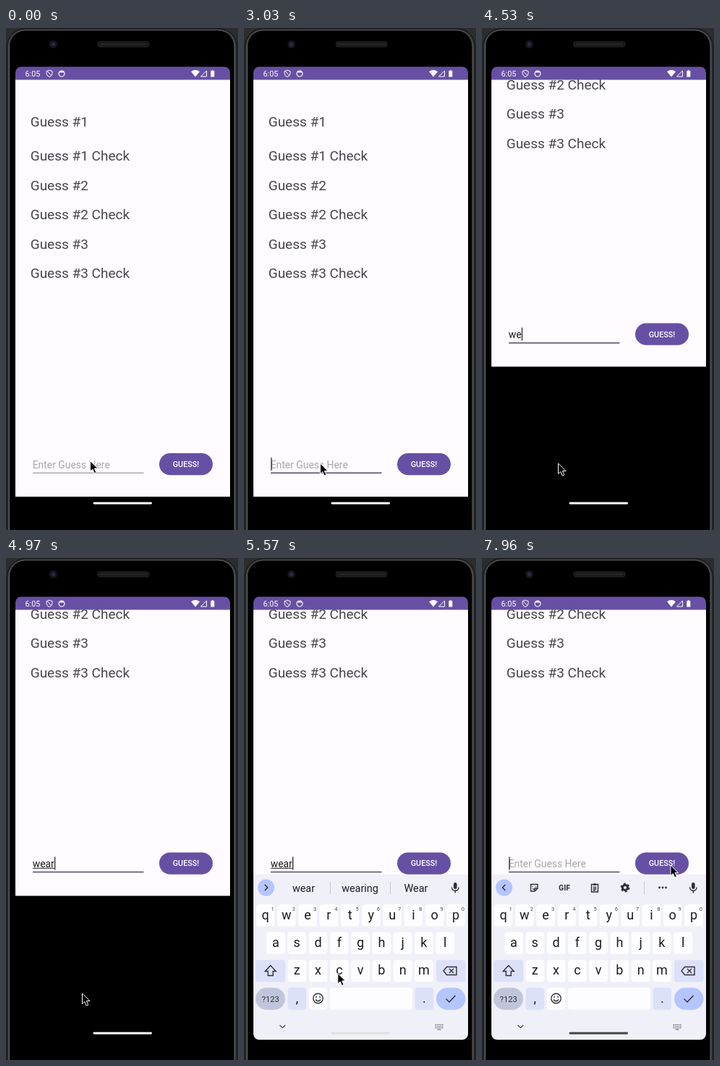
These frames come from a looping animation (321 by 693 pixels, 8 s). An HTML page:

```html
<!DOCTYPE html>
<html lang="en">
<head>
<meta charset="utf-8">
<title>Word guessing app</title>
<style>
  html, body { margin: 0; width: 100%; height: 100%; overflow: hidden; background: #000; }
  svg { display: block; width: 321px; height: 693px; font-family: Roboto, sans-serif; }
  .list { font-size: 19px; fill: #49454f; }
  .field { font-size: 13.9px; fill: #1c1b1f; }
  .key { font-size: 18px; text-anchor: middle; fill: #1b1b21; }
  .digit { font-size: 7.5px; text-anchor: middle; fill: #45464f; }
  .word { font-size: 14.4px; text-anchor: middle; fill: #1b1b21; }
  .line { fill: none; stroke: #303038; stroke-width: 1.4; }
</style>
</head>
<body>
<svg viewBox="0 0 321 693">
  <defs>
    <clipPath id="page"><rect x="13" y="71" width="297" height="594"/></clipPath>
    <clipPath id="screen"><path d="M13 71H310V657a8 8 0 0 1-8 8H21a8 8 0 0 1-8-8Z"/></clipPath>
  </defs>

  <!-- phone body -->
  <rect width="321" height="693" fill="#2c2c2f"/>
  <rect x="1.500" y="1" width="318" height="720" rx="25" fill="#38393c" stroke="#0e0e10"/>
  <rect x="4.500" y="3" width="311.500" height="720" rx="22" fill="#000" stroke="#606165"/>
  <circle cx="65.500" cy="22.500" r="5.500" fill="#15161d"/>
  <circle cx="65.500" cy="22.500" r="2.500" fill="#262c4c"/>
  <rect x="127" y="19" width="71" height="7" rx="3" fill="#161516" stroke="#2a2829"/>
  <path d="M130 22.500H196" stroke="#333031" stroke-width="3" stroke-dasharray="1 1"/>

  <!-- app page -->
  <g clip-path="url(#page)">
    <g id="app">
      <rect x="13" y="71" width="297" height="576" fill="#fffbfe"/>
      <g id="list" class="list"></g>
      <path id="rule" d="M37 614.200H190.500"/>
      <text id="input" class="field" x="36.700" y="607.500"></text>
      <path id="composing" stroke="#1c1b1f"/>
      <path id="caret" stroke="#1c1b1f" stroke-width="1.200"/>
      <rect x="212" y="587" width="74" height="30.300" rx="15.150" fill="#6750a4"/>
      <text x="249" y="606" fill="#fff" font-size="10.800" font-weight="500" text-anchor="middle">GUESS!</text>
    </g>
  </g>

  <!-- status bar -->
  <path d="M13 71.500V61.500a8 8 0 0 1 8-8H302a8 8 0 0 1 8 8V71.500Z" fill="#6750a4"/>
  <g fill="#fff">
    <text x="26.500" y="66.800" font-size="10.800">6:05</text>
    <path d="M60 58.200L64 59.700V62.500Q64 66 60 67.600Q56 66 56 62.500V59.700ZM57.500 60L62.500 65.500" fill="none" stroke="#fff"/>
    <circle cx="77" cy="63" r="4" fill="none" stroke="#fff" stroke-width="1.200"/>
    <path d="M73.500 61.500A3.800 3.800 0 0 1 80.500 61.500Z"/>
    <path d="M256 60.300Q262 55.700 268 60.300L262 67.500Z"/>
    <path d="M269.500 67L277.500 59V67Z" fill="none" stroke="#fff"/>
    <path d="M284.700 58.300h2v1h1.600v8.200h-5v-8.200h1.400Z"/>
  </g>

  <!-- keyboard -->
  <g clip-path="url(#screen)">
    <g id="keyboard">
      <rect x="13" y="437" width="297" height="230" fill="#f0f0f9"/>
      <g id="keys"></g>
      <circle cx="30.500" cy="455" r="11.500" fill="#b4c5ff"/>
      <path id="chevron" class="line" stroke-width="1.600"/>
      <g id="tools">
        <path class="line" d="M67.500 450.500h9.500v5.500l-4 4h-5.500ZM73 460v-4h4M70 453.300v1M74.500 453.300v1M70 456.300q1 1.400 2.500 1"/>
        <text x="114" y="459" font-size="10.500" font-weight="700" text-anchor="middle" fill="#303038">GIF</text>
        <path class="line" d="M151.500 450.500h9v10.500h-9ZM153.800 451.200h4.400M153.700 454.500h4.600M153.700 456.700h4.600M153.700 458.800h3"/>
        <path class="line" d="M156 448.700v2" stroke-width="3"/>
        <circle class="line" cx="198" cy="455" r="3.600" style="stroke-width:3"/>
        <circle class="line" cx="198" cy="455" r="5.400" style="stroke-width:2" stroke-dasharray="2.830"/>
        <path d="M224.500 447v17" stroke="#c6c7d2"/>
        <g fill="#303038"><circle cx="245.500" cy="455" r="1.400"/><circle cx="250" cy="455" r="1.400"/><circle cx="254.500" cy="455" r="1.400"/></g>
      </g>
      <g id="words" class="word">
        <text x="82.500" y="461">wear</text><text x="160.500" y="461">wearing</text><text x="238" y="461">Wear</text>
        <path d="M119.500 447v17M202.500 447v17" stroke="#c6c7d2"/>
      </g>
      <rect x="290" y="448" width="4.600" height="9" rx="2.300" fill="#303038"/>
      <path class="line" d="M287.500 454.500a4.800 4.800 0 0 0 9.600 0M292.300 459.500v3"/>
      <path class="line" d="M49.500 645l3.800 3.600l3.800-3.600" style="stroke-width:1.100"/>
      <path d="M264.500 644.300h11M264.500 646.500h11M264.500 648.700h11" stroke="#5a5b64" stroke-width="1.200" stroke-dasharray="1.400 1"/>
      <path d="M267.500 651h5" stroke="#5a5b64"/>
    </g>
  </g>
  <rect id="pill" x="120.500" y="654.500" width="81.500" height="2.900" rx="1.450"/>
  <path id="mouse" d="M0 0V14.500L3.300 11.500L5.700 17L8.300 15.900L5.900 10.500H10.500Z" fill="#000" stroke="#fff"/>
</svg>
<script>
const $ = id => document.getElementById(id);
const LOOP = 8000;
const STEP = 150;

// Latest value whose start time has passed.
const at = (t, steps) => steps.findLast(s => t >= s[0])[1];
const ramp = (t, from, to) => Math.min(1, Math.max(0, (t - from) / (to - from)));
// Like ramp, but held between refreshes that begin at `from`.
const stepped = (t, from, to) => ramp(from + Math.floor((t - from) / STEP) * STEP, from, to);
const show = (id, on) => $(id).setAttribute('opacity', +on);

const labels = ['Guess #1', 'Guess #1 Check', 'Guess #2', 'Guess #2 Check', 'Guess #3', 'Guess #3 Check'];
$('list').innerHTML = labels.map((s, i) =>
  `<text x="33.700" y="${i ? 142.900 + 40.500 * i : 136}">${s}</text>`).join('');

function buildKeys() {
  const WHITE = '#fdfcff', TINT = '#dce1f9';
  const cap = (x, y, w, fill, r = 4) =>
    `<rect x="${x}" y="${y}" width="${w}" height="30.500" rx="${r}" fill="${fill}"/>`;
  const glyph = (x, y, s, cls = 'key') => `<text class="${cls}" x="${x}" y="${y}">${s}</text>`;
  const row = (letters, x0, y) => [...letters].map((s, i) => {
    const x = x0 + 29.270 * i;
    return cap(x - 12.800, y, 25.600, WHITE) + glyph(x, y + 20.700, s);
  }).join('');
  const digits = [...'1234567890'].map((s, i) => glyph(39.500 + 29.270 * i, 487, s, 'digit')).join('');
  const icon = d => `<path class="line" d="${d}"/>`;
  return row('qwertyuiop', 29.500, 478) + digits + row('asdfghjkl', 44, 516.300) + row('zxcvbnm', 73.300, 554.700)
    + cap(16, 554.700, 41, TINT) + cap(266, 554.700, 40.500, TINT)
    + cap(16, 593.200, 41, '#c1c5dc', 15.250) + cap(60.500, 593.200, 25.600, TINT) + cap(89.700, 593.200, 25.600, WHITE)
    + cap(118.800, 593.200, 114.300, WHITE) + cap(236.500, 593.200, 25.600, TINT) + cap(266, 593.200, 40.500, '#b4c5ff', 15.250)
    + '<text x="36.700" y="612.500" font-size="11" text-anchor="middle" fill="#303038">?123</text>'
    + glyph(73.300, 614, ',') + glyph(249.300, 614, '.')
    + icon('M36.700 562.500l-7.500 8h4v6h7v-6h4Z')
    + icon('M280.500 564.500h13.500v11h-13.500l-4.500-5.500ZM284 567l6 6M290 567l-6 6')
    + icon('M279.500 608.500l4.500 4.500l8.500-9')
    + '<circle class="line" cx="102.500" cy="608" r="6.700"/>'
    + icon('M99 609.500q3.500 4.500 7 0M100 605v2M105 605v2');
}
$('keys').innerHTML = buildKeys();

const typed = [[0, ''], [4380, 'w'], [4530, 'we'], [4670, 'wea'], [4820, 'wear'], [7070, '']];
const scroll = [[0, 0], [4530, -179.500], [4820, -180.600]];
const caretOn = [[0, 0], [1530, 1], [1830, 0], [2130, 1], [2430, 0], [3030, 1],
  [5270, 0], [5570, 1], [6320, 0], [6620, 1], [7520, 0], [7960, 1]];

// Keyboard slides up 228px with a decelerating curve.
const keyboardDrop = t => 228 * (1 - stepped(t, 4970 - STEP / 2, 5190 + STEP / 2)) ** 2;

function mousePosition(t) {
  if (t < 1380) return [116.500, 597.500];
  if (t < 1530) return [110, 600];
  const p = t < 5570 ? 0 : stepped(t, 5420, 6020);
  const eased = p * p * (3 - 2 * p);
  return [105.500 + 155.500 * eased, 601 - 177 * eased];
}

function draw(t) {
  const text = at(t, typed), input = $('input');
  input.textContent = text || 'Enter Guess Here';
  input.style.fill = text ? '' : '#a8a5a9';
  const end = 36.700 + (text ? input.getComputedTextLength() : .300);
  $('caret').setAttribute('d', `M${end + .900} 593V611`);
  show('caret', at(t, caretOn));
  $('composing').setAttribute('d', `M37 608.900H${end}`);
  show('composing', text === 'wear');

  const focused = t >= 1530;
  $('rule').setAttribute('stroke', focused ? '#504a6c' : '#858288');
  $('rule').setAttribute('stroke-width', focused ? 1.500 : 1);
  $('app').setAttribute('transform', `translate(0 ${at(t, scroll)})`);

  const suggesting = t >= 5420 && t < 7220;
  $('keyboard').setAttribute('transform', `translate(0 ${keyboardDrop(t)})`);
  $('chevron').setAttribute('d', suggesting ? 'M28.700 451l4 4l-4 4' : 'M32.300 451l-4 4l4 4');
  show('words', suggesting);
  show('tools', suggesting ? 0 : t < 5420 ? 1 : stepped(t, 7070, 7370));

  const shade = 255 - 187 * stepped(t, 5420, 6320);
  $('pill').setAttribute('fill', `rgb(${shade} ${shade} ${shade})`);
  $('mouse').setAttribute('transform', `translate(${mousePosition(t)})`);
}

function tick() {
  draw(performance.now() % LOOP);
  requestAnimationFrame(tick);
}
tick();
</script>
</body>
</html>
```
